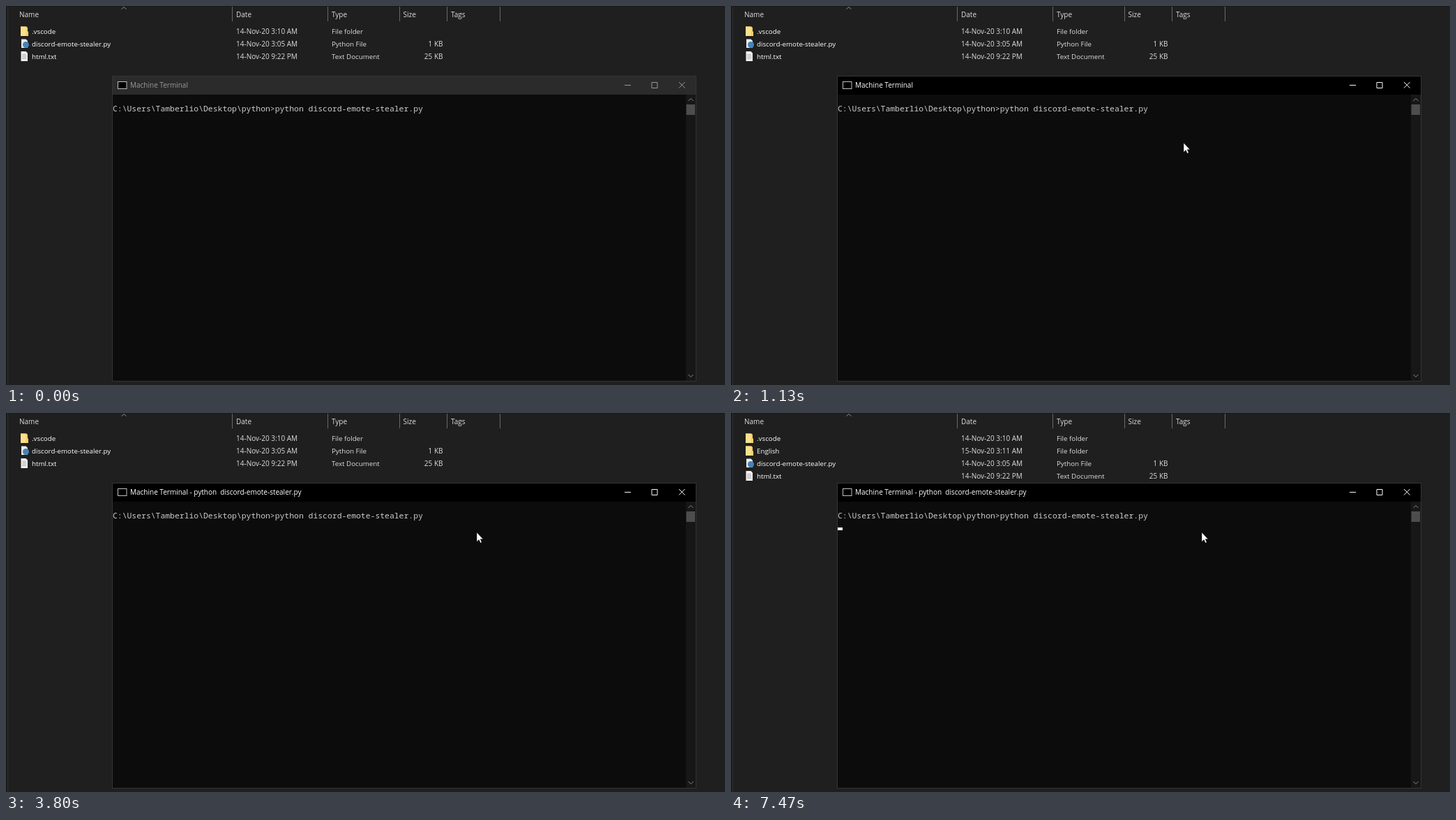
Recreate the animation shown at these times as an HTML page. Size 1031 by 543 pixels, loop 8000 ms.

```html
<!DOCTYPE html>
<html lang="en">
<head>
<meta charset="utf-8">
<title>Script run</title>
<style>
  html, body { margin: 0; width: 100%; height: 100%; overflow: hidden; background: #1f1f1f; }
  svg { display: block; }
  text { font: 10px "Open Sans", "Noto Sans", sans-serif; fill: #dedede; white-space: pre; }
  .name, .type { font-size: 9.75px; }
  .name { fill: #fff; }
  .mono { font: 11.41px "Noto Sans Mono", "DejaVu Sans Mono", monospace; fill: #ccc; }
  .line { fill: none; stroke: #8a8a8a; }
  #bar { --ink: #999; --fill: #2b2b2b; }
  #bar.active { --ink: #fff; --fill: #000; }
  #bar text { fill: var(--ink); }
  #bar path { fill: none; stroke: var(--ink); }
  #bar rect { fill: var(--fill); }
</style>
</head>
<body>
<svg width="1031" height="543" viewBox="0 0 1031 543">
  <defs>
    <g id="folder">
      <path d="M21 29.500h8.500l1.500 1.500v5l1 1v6H21z" fill="#f3d16c"/>
      <path d="M21 29.500h7.500V43H21z" fill="#fbe08b"/>
    </g>
    <g id="page">
      <path d="M21.500 29h7l2.500 2.500V43h-9.500z" fill="#f2f2f2"/>
      <path d="M23 33.500h6m-6 2h6.500m-6.500 2h6.500m-6.500 2h6.500" stroke="#a5a5a5" stroke-width=".8"/>
    </g>
    <g id="script">
      <path d="M22 29.500h6.500l2.500 2.500v10h-9z" fill="#ededed"/>
      <circle cx="28.500" cy="37.500" r="4.500" fill="#4584b6"/>
    </g>
  </defs>

  <rect width="1031" height="543" fill="#1f1f1f"/>
  <path d="M0 0h1031v1H3v542H0z" fill="#191919"/>
  <path d="M2.500 1v542" stroke="#303030"/>
  <path d="M324.500 1v21m137-21v21m103-21v21m68-21v21m76-21v21" stroke="#696969"/>
  <path class="line" d="M165.500 4.500l3.500-3 3.500 3"/>
  <g id="headers"></g>
  <g id="files"></g>

  <rect x="152.500" y="100.500" width="837" height="437" fill="#0c0c0c" stroke="#343434"/>
  <g id="bar">
    <rect x="153" y="101" width="836" height="26"/>
    <text id="title" x="178" y="117"></text>
    <path d="M887 113.500h9M926 109.500h8v8h-8zM965 109l8.500 8.500m0-8.500l-8.500 8.500"/>
  </g>
  <rect x="160.500" y="108.500" width="12.500" height="10" stroke="#c0c0c0"/>
  <rect x="975" y="127" width="14" height="410" fill="#171717"/>
  <rect x="975.500" y="141" width="12.500" height="15" fill="#4d4d4d"/>
  <path class="line" d="M978.500 136l3.500-3.500 3.500 3.500M978.500 528l3.500 3.500 3.500-3.500"/>
  <text class="mono" x="153" y="151">C:\Users\Tamberlio\Desktop\python&gt;python discord-emote-stealer.py</text>
  <rect id="caret" width="7" height="4" fill="#f2f2f2"/>
  <path id="pointer" d="M0 0v13.500l3.200-2.900 2 4.600 2.100-.9-2-4.500h3.900z" fill="#fff" stroke="#000" stroke-width=".5"/>
</svg>
<script>
const LOOP = 8000, STEP = 200 / 3;
const FOCUS = 1130, ENTER = 2530, CREATED = 3870;
const BLINKS = [1670, 2200, 2530, 2730, 3270, 3800, 4330, 4870, 5400, 5930, 6470, 6930, 7470];
const byId = id => document.getElementById(id);
const [bar, title, files, caret, pointer] = ["bar", "title", "files", "caret", "pointer"].map(byId);

const label = (x, y, text, attrs = "") => `<text x="${x}" y="${y}" ${attrs}>${text}</text>`;
const row = ([icon, name, date, type, size], i) => `<g transform="translate(0 ${i * 18})">
  <use href="#${icon}"/>${label(37, 40, name, 'class="name"')}${label(330, 40, date)}
  ${label(467, 40, type, 'class="type"')}${label(626.5, 40, size, 'text-anchor="end"')}</g>`;

byId("headers").innerHTML = [[19, "Name"], [330, "Date"], [467, "Type"], [569.5, "Size"], [638, "Tags"]]
  .map(([x, text]) => label(x, 15.5, text)).join("");

const before = [
  ["folder", ".vscode", "14-Nov-20 3:10 AM", "File folder", ""],
  ["script", "discord-emote-stealer.py", "14-Nov-20 3:05 AM", "Python File", "1 KB"],
  ["page", "html.txt", "14-Nov-20 9:22 PM", "Text Document", "25 KB"],
];
const after = [before[0], ["folder", "English", "15-Nov-20 3:11 AM", "File folder", ""], ...before.slice(1)];
const listings = [before, after].map(list => list.map(row).join(""));
let shown = -1;

const bezier = (a, b, c, d, p) => {
  const q = 1 - p;
  return a * q ** 3 + 3 * b * q * q * p + 3 * c * q * p * p + d * p ** 3;
};

// The pointer sweeps in from the right, rests, then nudges up and right.
function pointerAt(t) {
  const sweep = Math.min(Math.floor((t - 130) / STEP + 0.05) / 12, 1);
  const nudge = Math.max(0, Math.min((Math.floor((t - 1470) / STEP + 0.1) + 1) / 9, 1));
  const eased = nudge * nudge * (3 - 2 * nudge);
  return [
    Math.round(bezier(1012, 270, 340, 649, sweep) + 26 * eased),
    Math.round(bezier(520, 520, 300, 196, sweep) - 25 * eased),
  ];
}

function draw(t) {
  const entered = t >= ENTER;
  bar.classList.toggle("active", t >= FOCUS);
  title.textContent = "Machine Terminal" + (entered ? " - python  discord-emote-stealer.py" : "");

  const listing = +(t >= CREATED);
  if (listing !== shown) files.innerHTML = listings[shown = listing];

  caret.setAttribute("x", entered ? 153 : 598);
  caret.setAttribute("y", entered ? 164 : 150);
  caret.setAttribute("visibility", BLINKS.filter(b => b <= t).length % 2 ? "visible" : "hidden");

  pointer.setAttribute("visibility", t >= 130 ? "visible" : "hidden");
  if (t >= 130) pointer.setAttribute("transform", `translate(${pointerAt(t)})`);
}

const start = performance.now();
function tick() {
  draw((performance.now() - start) % LOOP);
  requestAnimationFrame(tick);
}
tick();
</script>
</body>
</html>
```
